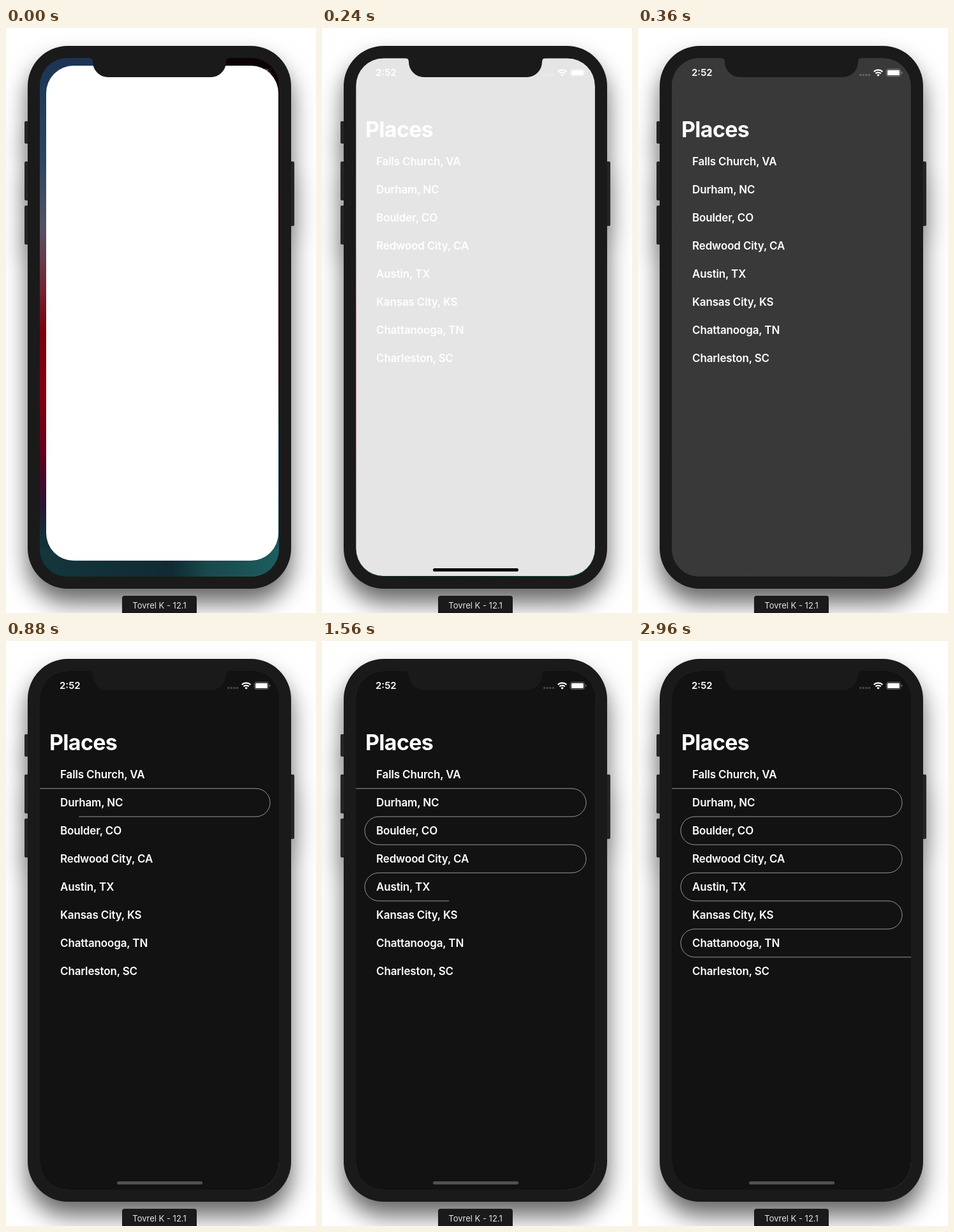
An HTML page that plays this animation: 486x916 px, repeating every 3240 ms.

```html
<!DOCTYPE html>
<html lang="en">
<head>
<meta charset="utf-8">
<title>Places</title>
<style>
  html, body { margin: 0; width: 100%; height: 100%; overflow: hidden; background: #fff; }
  svg { display: block; font-family: Inter, sans-serif; font-weight: 600; fill: #fff; }
  .device { fill: #1a1a1a; filter: drop-shadow(0 22px 18px rgba(0, 0, 0, .6)); }
  .buttons { fill: #252525; }
  .item { font-size: 17px; letter-spacing: -.15px; }
</style>
</head>
<body>
<svg width="486" height="916" viewBox="0 0 486 916">
  <defs>
    <clipPath id="screen"><rect x="53" y="47" width="375" height="812" rx="43"/></clipPath>
    <linearGradient id="leftWall" x2="0" y2="1">
      <stop offset="0" stop-color="#1c3454"/>
      <stop offset=".2" stop-color="#2b4661"/>
      <stop offset=".33" stop-color="#565266"/>
      <stop offset=".43" stop-color="#6f2c38"/>
      <stop offset=".53" stop-color="#78000c"/>
      <stop offset=".65" stop-color="#83000f"/>
      <stop offset=".76" stop-color="#62001c"/>
      <stop offset=".86" stop-color="#2a1434"/>
      <stop offset=".92" stop-color="#143039"/>
      <stop offset="1" stop-color="#12343a"/>
    </linearGradient>
    <linearGradient id="rightWall" x2="0" y2="1">
      <stop offset="0" stop-color="#0c0204"/>
      <stop offset=".3" stop-color="#260808"/>
      <stop offset=".6" stop-color="#3a1414"/>
      <stop offset=".75" stop-color="#1b4c50"/>
      <stop offset="1" stop-color="#1c585a"/>
    </linearGradient>
    <linearGradient id="bottomWall">
      <stop offset="0" stop-color="#14363d"/>
      <stop offset=".55" stop-color="#102a33"/>
      <stop offset=".7" stop-color="#1a484c"/>
      <stop offset="1" stop-color="#1d5d5d"/>
    </linearGradient>
  </defs>

  <g class="device">
    <g class="buttons">
      <rect x="29" y="146" width="10" height="35" rx="2"/>
      <rect x="29" y="209" width="10" height="61" rx="2"/>
      <rect x="29" y="278" width="10" height="61" rx="2"/>
      <rect x="442" y="209" width="10" height="101" rx="2"/>
    </g>
    <rect x="34" y="28" width="413" height="850" rx="63"/>
  </g>

  <g clip-path="url(#screen)">
    <rect x="53" y="47" width="240" height="812" fill="url(#leftWall)"/>
    <rect x="293" y="47" width="135" height="812" fill="url(#rightWall)"/>
    <rect x="53" y="815" width="375" height="44" fill="url(#bottomWall)"/>
    <rect id="app" rx="43"/>
    <g id="content">
      <text x="84" y="75" font-size="15">2:52</text>
      <g fill-opacity=".22">
        <circle cx="348.7" cy="73.5" r="1.8"/><circle cx="353.3" cy="73.5" r="1.8"/>
        <circle cx="357.9" cy="73.5" r="1.8"/><circle cx="362.5" cy="73.5" r="1.8"/>
      </g>
      <g fill="none" stroke="#fff" stroke-width="2.2">
        <path d="M369.8 68.4a9.8 9.8 0 0 1 13.6 0M372.4 71.3a6 6 0 0 1 8.4 0"/>
      </g>
      <path d="M376.6 75.8l-2.2-2.4a3.2 3.2 0 0 1 4.4 0z"/>
      <rect x="389.5" y="64.5" width="22" height="11" rx="3" fill="none" stroke="#fff" stroke-opacity=".4"/>
      <path d="M413 68v4q1.5-.6 1.5-2t-1.5-2z" fill-opacity=".4"/>
      <rect x="391" y="66" width="19" height="8" rx="1.6"/>
      <text x="68" y="171" font-size="34" font-weight="700" letter-spacing="-.7">Places</text>
    </g>
    <path id="route" fill="none" stroke="#999" pathLength="1"/>
    <rect id="home" x="174" y="846" width="134" height="5" rx="2.5"/>
  </g>
  <path fill="#1a1a1a" d="M130 46v1q6 0 6 6a24 24 0 0 0 24 24H321a24 24 0 0 0 24-24q0-6 6-6v-1z"/>

  <rect x="182" y="889" width="117" height="32" rx="4" fill="#1a1a1a"/>
  <text x="240.5" y="909" font-size="13" font-weight="400" text-anchor="middle" fill="#e4e4e4">Tovrel K - 12.1</text>
</svg>

<script>
const LOOP = 3240, STEP = 40, TOP = 231, ROW = 44;
const places = ['Falls Church, VA', 'Durham, NC', 'Boulder, CO', 'Redwood City, CA',
  'Austin, TX', 'Kansas City, KS', 'Chattanooga, TN', 'Charleston, SC'];
const [app, content, route, home] =
  ['app', 'content', 'route', 'home'].map(id => document.getElementById(id));

const set = (el, attrs) => {
  for (const name in attrs) el.setAttribute(name, attrs[name]);
};
const mix = (a, b, p) => a + (b - a) * p;
const ramp = (t, from, to) => Math.min(1, Math.max(0, (t - from) / (to - from)));
const smooth = p => p * p * (3 - 2 * p);
const gray = v => `rgb(${v},${v},${v})`;

places.forEach((name, i) => {
  const text = document.createElementNS('http://www.w3.org/2000/svg', 'text');
  set(text, { class: 'item', x: 85, y: 215 + i * ROW });
  text.textContent = name;
  content.append(text);
});

// Winding line between the rows, turning alternately right and left.
let d = `M53 ${TOP}`;
for (let i = 0; i < 6; i++) d += `H${i % 2 ? 89 : 392}a22 22 0 0 ${i % 2 ? 0 : 1} 0 ${ROW}`;
set(route, { d: d + 'H428' });

function draw(t) {
  // The launch window grows to the full screen, then fades from white to dark.
  const gap = Math.exp(-t / 75);
  const x = 53 + 10 * gap, y = 47 + 12 * gap;
  set(app, {
    x, y, width: 428 - gap - x, height: 859 - 25 * gap - y,
    fill: gray(mix(255, 18, smooth(ramp(t, 194, 417))))
  });
  set(home, { fill: gray(mix(0, 80, ramp(t, 260, 400))), opacity: ramp(t, 60, 200) });

  const drawn = t < 1560
    ? mix(0, .6268, ramp(t, 388, 1560))
    : mix(.6268, 1, ramp(t, 1560, 2195));
  set(route, { 'stroke-dasharray': drawn < 1 ? `${drawn} 2` : 'none', opacity: drawn ? 1 : 0 });
}

function tick() {
  const t = performance.now() % LOOP;
  draw(Math.floor(t / STEP) * STEP);
  requestAnimationFrame(tick);
}
tick();
</script>
</body>
</html>
```
